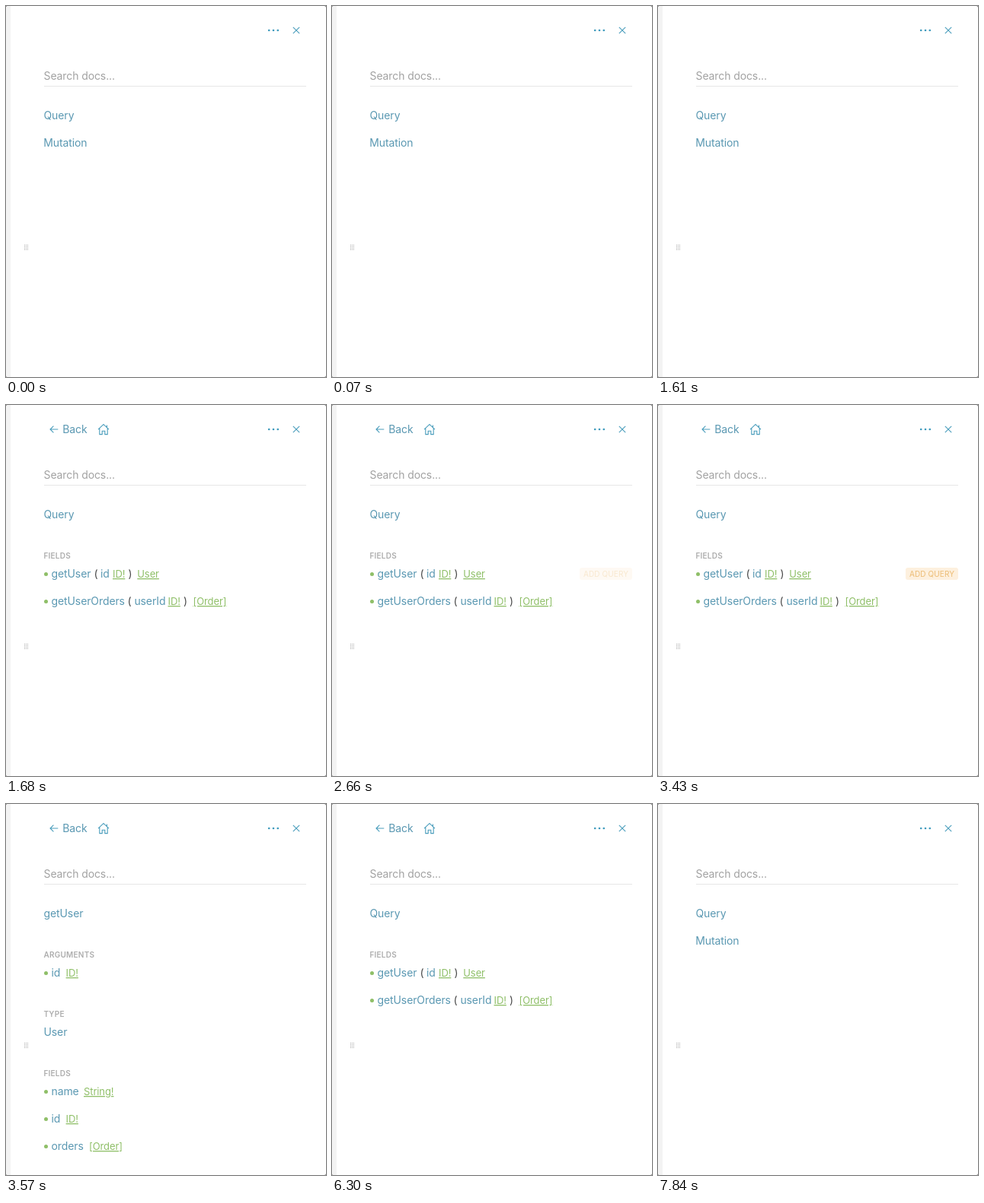
An HTML page that plays this animation: 420 px wide and 488 px high, repeating every 8000 ms.

```html
<!DOCTYPE html>
<html>
<head>
<meta charset="utf-8">
<style>
html, body { margin: 0; width: 420px; height: 488px; overflow: hidden; background: #777; }
svg { display: block; }
text { font: 14px Inter, "Open Sans", sans-serif; letter-spacing: -.1px; fill: #5a98b2; white-space: pre; }
.type { font-size: 13px; fill: #8fbf68; text-decoration: underline; }
.head { font-size: 10px; font-weight: 600; letter-spacing: .25px; fill: #adadad; }
.paren { fill: #4a4a4a; }
.hint { fill: #a2a2a2; }
.add { font-size: 10px; letter-spacing: .1px; fill: #ecbc74; }
.icon { fill: none; stroke: #4a9dbc; stroke-width: 1.1; }
</style>
</head>
<body>
<svg width="420" height="488" viewBox="0 0 420 488">
  <rect width="420" height="488" rx="2.5" fill="#fff"/>
  <path d="M6 0H2.5Q0 0 0 2.5V485.5Q0 488 2.5 488H6Z" fill="#f3f3f3"/>
  <g id="grip" fill="#aaa"></g>
  <g fill="#3f9bbd">
    <circle cx="345.2" cy="32" r="1.35"/>
    <circle cx="351" cy="32" r="1.35"/>
    <circle cx="356.8" cy="32" r="1.35"/>
  </g>
  <path class="icon" d="M376.8 27.8l8.4 8.4m0-8.4l-8.4 8.4"/>
  <text class="hint" x="49.5" y="97">Search docs...</text>
  <rect x="50" y="105" width="344" height="1" fill="#e6e6e6"/>
  <g id="nav">
    <path class="icon" d="M68.3 32H58m4.4-4.4L58 32l4.4 4.4"/>
    <text x="74.3" y="37">Back</text>
    <path class="icon" d="M121 32.2l7-6.8 7 6.8M122.8 30.6v8h3.4v-4.4h3.6v4.4h3.4v-8M132.4 29.4v-3"/>
  </g>
  <g id="root"></g>
  <g id="query"></g>
  <g id="field"></g>
  <g id="add">
    <rect x="325" y="214" width="69" height="16" rx="3" fill="#fdf0de"/>
    <text class="add" x="330" y="226">ADD QUERY</text>
  </g>
</svg>
<script>
const $ = id => document.getElementById(id);
const text = (x, y, s, kind = '') => `<text class="${kind}" x="${x}" y="${y}">${s}</text>`;
const head = (y, s) => text(49.4, y, s, 'head');
const dot = y => `<circle cx="52.5" cy="${y - 4.5}" r="2.5" fill="#8fbf68"/>`;
const member = (y, name, x, type) => dot(y) + text(59.5, y, name) + text(x, y, type, 'type');

// each method: name, then the x of "(", argument, its type, ")" and the result
const method = (y, name, arg, result, [open, argX, typeX, close, resultX]) =>
  member(y, name, resultX, result) + text(open, y, '(', 'paren') + text(argX, y, arg) +
  text(typeX, y, 'ID!', 'type') + text(close, y, ')', 'paren');

for (let i = 0; i < 12; i++)
  $('grip').innerHTML += `<rect x="${24 + i % 3 * 2}" y="${314 + (i / 3 | 0) * 2}" width="1" height="1"/>`;

$('root').innerHTML = text(49.5, 149, 'Query') + text(49.2, 185, 'Mutation');

$('query').innerHTML = text(49.5, 149, 'Query') + head(202, 'FIELDS') +
  method(227, 'getUser', 'id', 'User', [115.5, 124, 140, 160.5, 172.3]) +
  method(263, 'getUserOrders', 'userId', '[Order]', [159.5, 168.4, 212.5, 233, 245.5]);

$('field').innerHTML = text(49.5, 149, 'getUser') +
  head(202, 'ARGUMENTS') + member(227, 'id', 78.6, 'ID!') +
  head(280, 'TYPE') + text(49.5, 305, 'User') +
  head(358, 'FIELDS') + member(383, 'name', 102, 'String!') +
  member(419, 'id', 78.6, 'ID!') + member(455, 'orders', 109, '[Order]');

const show = (id, on) => $(id).style.display = on ? '' : 'none';

function draw(now) {
  const t = now % 8000;
  const page = t < 1680 || t >= 7840 ? 'root' : t >= 3570 && t < 6300 ? 'field' : 'query';
  for (const id of ['root', 'query', 'field']) show(id, id === page);
  show('nav', page !== 'root');
  show('add', t >= 2660 && t < 3570);
  // the button fades in by three steps of 70 ms
  $('add').style.opacity = Math.min(1, .33 * (1 + Math.floor((t - 2660) / 70)) + .01);
  requestAnimationFrame(draw);
}
draw(performance.now());
</script>
</body>
</html>
```
